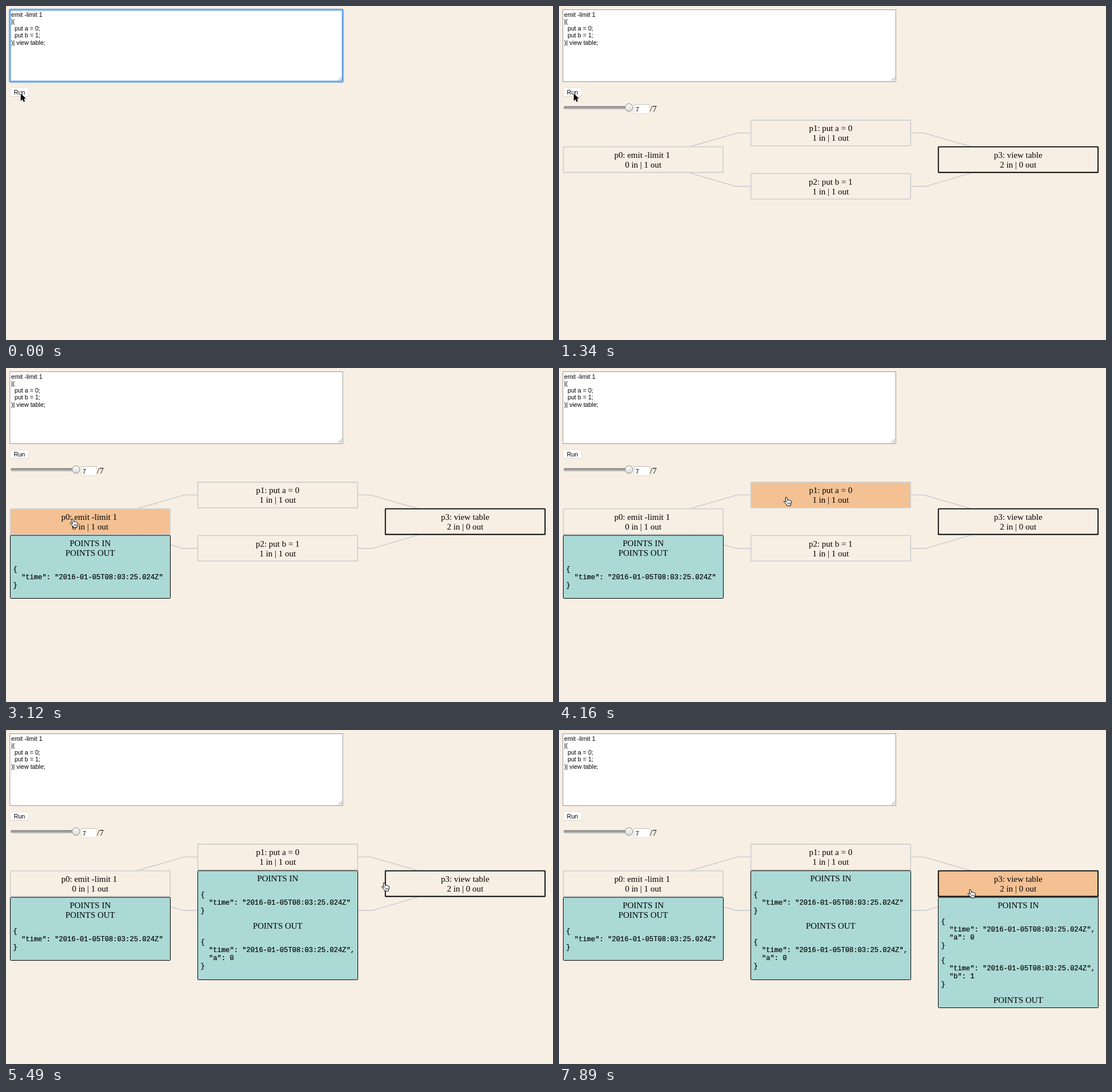
Write an HTML page that moves like this. It is 957 px wide and 585 px high and loops after 8000 ms.

```html
<!DOCTYPE html>
<html lang="en">
<head>
<meta charset="utf-8">
<title>Flow graph stepper</title>
<style>
  html, body { margin: 0; width: 100%; height: 100%; overflow: hidden; background: #f8efe4; }
  svg { display: block; }
  text { white-space: pre; }
  .sans { font-family: "Liberation Sans", Arial, sans-serif; font-size: 10.7px; }
  .serif { font-family: "Liberation Serif", Times, serif; font-size: 14.95px; }
  .mid { text-anchor: middle; }
  .mono { font-family: "Liberation Mono", "Courier New", monospace; font-size: 12.15px; stroke: #000; stroke-width: .2; }
  .edge { fill: none; stroke: #d1d1d1; stroke-width: 1.8; }
  .panel { fill: #abd9d6; stroke: #000; }
</style>
</head>
<body>
<svg width="957" height="585" viewBox="0 0 957 585">
  <defs>
    <linearGradient id="knob" x2="0" y2="1">
      <stop stop-color="#fdfdfd"/><stop offset="1" stop-color="#d9d9d9"/>
    </linearGradient>
    <linearGradient id="track" x2="0" y2="1">
      <stop stop-color="#777"/><stop offset="1" stop-color="#c9c9c9"/>
    </linearGradient>
  </defs>

  <rect x="6.8" y="6.5" width="582.4" height="126" fill="#fff" stroke="#979797"/>
  <g id="focus" fill="none" stroke="#5a9fe9">
    <rect x="6.8" y="6.5" width="582.4" height="126" rx="1.5" stroke-width="4.5" opacity=".45"/>
    <rect x="6.8" y="6.5" width="582.4" height="126" rx="1" stroke-width="2"/>
  </g>
  <path d="M581.5 131 588 124.5M585 131 588 128" stroke="#777" stroke-width=".9"/>
  <g id="code"></g>
  <path id="caret" d="M67.5 57V69" stroke="#000"/>

  <rect x="7" y="143.6" width="33" height="15.4" rx="3.5" fill="#cfc8bf"/>
  <rect x="7.4" y="143.2" width="32.2" height="15" rx="3.2" fill="#fff" stroke="#e2dcd4" stroke-width=".6"/>
  <text class="sans mid" x="23.5" y="154.8">Run</text>

  <g id="slider">
    <rect x="8.5" y="175.8" width="114" height="4.4" rx="1.5" fill="url(#track)" stroke="#8b8b88" stroke-width=".6"/>
    <circle cx="122.3" cy="177.8" r="6.7" fill="url(#knob)" stroke="#858585"/>
    <rect x="131.5" y="172.5" width="27" height="16" fill="#fff" stroke="#e3ddd5"/>
    <path d="M131 172.5H159" stroke="#c4c0ba"/>
    <text class="sans" x="134" y="184.7">7</text>
    <text class="serif" x="159.3" y="185">/7</text>
  </g>

  <g id="graph">
    <path class="edge" d="M229 246.3 312 222.3H335M229 292.5 310 316H335M616 222.3H638L721 246.3M616 316H641L721 292.5"/>
  </g>
  <g id="panels"></g>

  <g id="arrow">
    <path d="M0 0V13.4L3 10.6 5.1 15 7.4 14 5.4 9.6H9.4Z" stroke="#fff" stroke-width="1.6" paint-order="stroke"/>
  </g>
  <g id="hand" stroke="#000" stroke-linejoin="round">
    <path fill="#fff" d="M0 8.5 -1.4 1.6Q-1.6 -.2 -.2 -.2 1 -.2 1.4 1.4L2.3 5Q3.8 3.8 4.6 5.2 6 4.2 6.9 5.8 8.6 5.2 8.9 7 9.3 10 8 12L7.6 14.6H1.4L.6 12.8Q-1.6 10.5 -4 8 -4.6 6.2 -2.6 6.6Z"/>
    <path stroke-width=".8" d="M2.6 9V12M4.6 9V12M6.6 9V12"/>
  </g>
</svg>

<script>
const LOOP = 8000;
const $ = id => document.getElementById(id);

function add(parent, tag, attrs, content = "") {
  const el = document.createElementNS("http://www.w3.org/2000/svg", tag);
  for (const key in attrs) el.setAttribute(key, attrs[key]);
  el.textContent = content;
  return parent.appendChild(el);
}

const show = (el, on) => el.setAttribute("visibility", on ? "visible" : "hidden");

["emit -limit 1", "|(", "  put a = 0;", "  put b = 1;", ")| view table;"].forEach((line, i) =>
  add($("code"), "text", { class: "sans", x: 9, y: 19 + i * 12.15 }, line));

// A point printed as JSON, with an optional extra field
const stamp = '"time": "2016-01-05T08:03:25.024Z"';
const point = extra => ["{", "  " + stamp + (extra ? "," : ""), ...(extra ? ["  " + extra] : []), "}"];

const ROW = 46.7;
const nodes = [
  { x: 7, y: 246, label: ["p0: emit -limit 1 ", "0 in | 1 out"], opens: 3120, height: 110.4,
    heads: [[19, "POINTS IN"], [35.8, "POINTS OUT"]], points: [[63.2, point()]] },
  { x: 335, y: 246 - ROW, label: ["p1: put a = 0", "1 in | 1 out"], opens: 4610, height: 191,
    heads: [[18.7, "POINTS IN"], [102, "POINTS OUT"]], points: [[45.7, point()], [129.2, point('"a": 0')]] },
  { x: 335, y: 246 + ROW, label: ["p2: put b = 1", "1 in | 1 out"] },
  { x: 663, y: 246, label: ["p3: view table", "2 in | 0 out"], opens: 6240, height: 193.4, stroke: "#000",
    heads: [[19, "POINTS IN"], [184.8, "POINTS OUT"]],
    points: [[46.3, point('"a": 0')], [114.7, point('"b": 1')]] }
];

function build(node) {
  const { x, y } = node, mid = x + 140.3, top = y + ROW;
  node.rect = add($("graph"), "rect", {
    x: x + .7, y: y + .7, width: 279.4, height: 44.8, rx: .6,
    stroke: node.stroke || "#d1d1d1", "stroke-width": 1.8
  });
  node.label.forEach((line, i) =>
    add($("graph"), "text", { class: "serif mid", x: mid, y: y + 19.8 + i * 17 }, line));
  if (!node.opens) return;
  node.panel = add($("panels"), "g", {});
  add(node.panel, "rect", { class: "panel", x: x + .5, y: top + .4, width: 280, height: node.height, rx: 1.2 });
  for (const [dy, head] of node.heads)
    add(node.panel, "text", { class: "serif mid", x: mid, y: top + dy }, head);
  for (const [dy, lines] of node.points)
    lines.forEach((line, i) =>
      add(node.panel, "text", { class: "mono", x: x + 5.4, y: top + dy + i * 14 }, line));
}
nodes.forEach(build);

// Pointer moves: first step, last step, number of steps, end position
const start = [25.8, 153];
const moves = [
  [1790, 2670, 7, 116.5, 264.5],
  [3560, 4160, 5, 397.5, 226.5],
  [5050, 5200, 2, 599, 257],
  [5490, 5490, 1, 661.5, 267.5],
  [5640, 5790, 2, 726.5, 279.5],
  [7890, 7890, 1, 719.5, 279.5]
];

function pointer(t) {
  let [x, y] = start;
  for (const [from, to, steps, endX, endY] of moves) {
    if (t < from) break;
    const gap = (to - from) / (steps - 1 || 1) || 1;
    const p = Math.min(1, (Math.floor((t - from) / gap) + 1) / steps);
    const eased = p * p * (3 - 2 * p);
    x += (endX - x) * eased;
    y += (endY - y) * eased;
  }
  return [x, y];
}

function draw(t) {
  const [x, y] = pointer(t);
  const over = (n, pad) =>
    x > n.x - pad && x < n.x + 281 + pad && y > n.y - pad && y < n.y + 46 + pad;
  const onNode = t >= 1790 && nodes.some(n => over(n, 2));

  show($("focus"), t < 750);
  show($("caret"), t >= 450 && t < 750);
  show($("slider"), t >= 1340);
  $("graph").setAttribute("display", t >= 890 ? "inline" : "none");
  $("graph").setAttribute("transform", `translate(0 ${t < 1340 ? -34 : 0})`);

  for (const n of nodes) {
    n.rect.setAttribute("fill", t >= 1790 && over(n, 0) ? "#f3c193" : "none");
    if (n.panel) show(n.panel, t >= n.opens);
  }
  for (const id of ["arrow", "hand"]) {
    $(id).setAttribute("transform", `translate(${x} ${y})`);
    show($(id), onNode === (id === "hand"));
  }
}

function tick() {
  draw(performance.now() % LOOP);
  requestAnimationFrame(tick);
}
tick();
</script>
</body>
</html>
```
